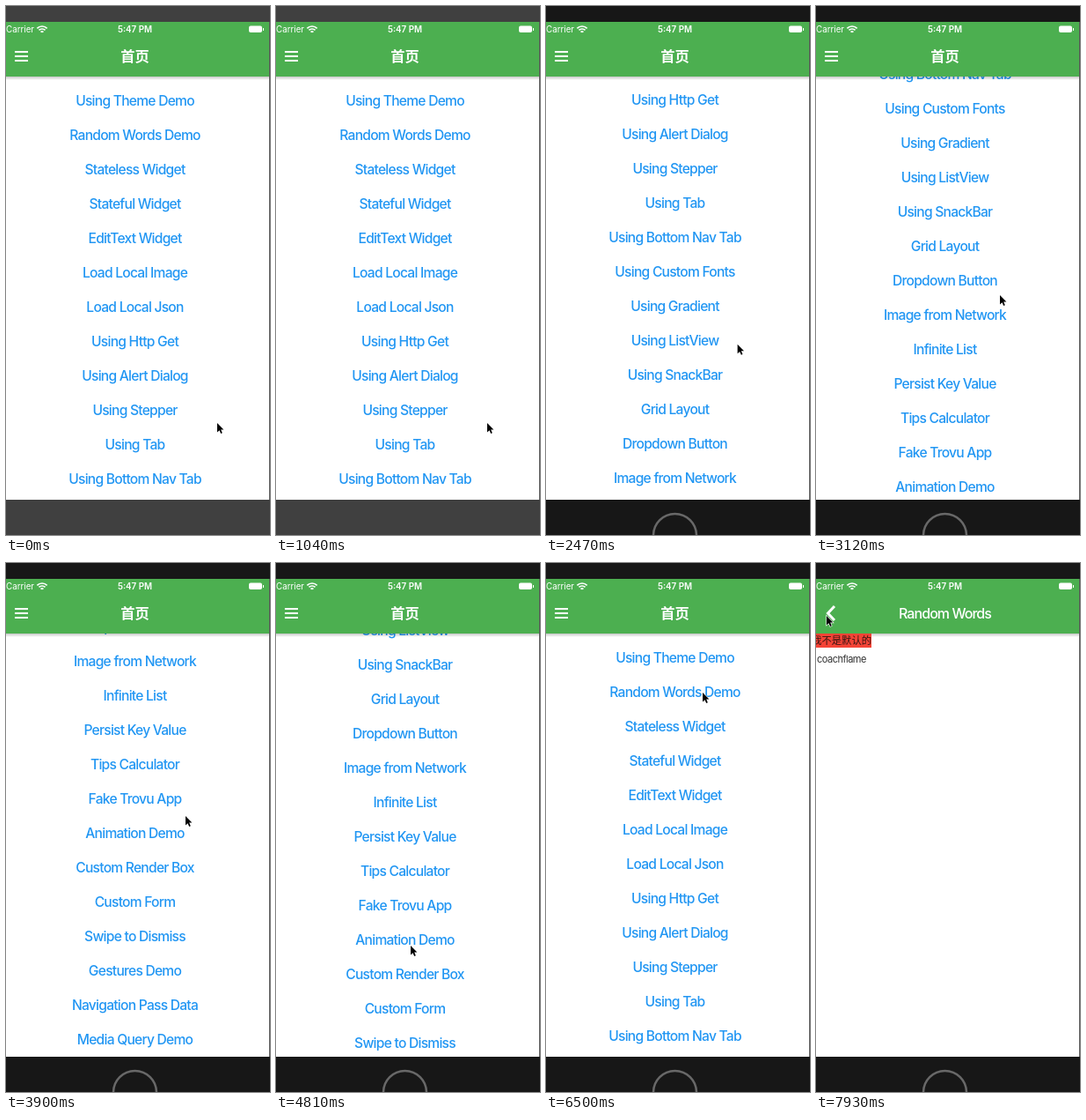
An HTML page with a canvas that plays this animation: 300 by 600 pixels, repeating every 8 s.

```html
<!DOCTYPE html>
<html lang="zh">
<meta charset="utf-8">
<style>
html, body { margin: 0; width: 100%; height: 100%; overflow: hidden; background: #171717 }
canvas { display: block }
</style>
<canvas id="stage" width="300" height="600"></canvas>
<script>
const ctx = document.getElementById('stage').getContext('2d');
const LOOP = 8000, STEP = 130, ROW = 39, MID = 146.5;
const GREEN = '#4caf50', BLUE = '#2196f3';
const FONT = 'Inter, "Noto Sans CJK SC", "Noto Sans CJK", sans-serif';
const ARROW = new Path2D('M0 0V10.5L2.5 8.3 4.2 12 5.8 11.3 4.2 7.6H7.4Z');
const labels = ['Using Theme Demo', 'Random Words Demo', 'Stateless Widget', 'Stateful Widget',
  'EditText Widget', 'Load Local Image', 'Load Local Json', 'Using Http Get', 'Using Alert Dialog',
  'Using Stepper', 'Using Tab', 'Using Bottom Nav Tab', 'Using Custom Fonts', 'Using Gradient',
  'Using ListView', 'Using SnackBar', 'Grid Layout', 'Dropdown Button', 'Image from Network',
  'Infinite List', 'Persist Key Value', 'Tips Calculator', 'Fake Trovu App', 'Animation Demo',
  'Custom Render Box', 'Custom Form', 'Swipe to Dismiss', 'Gestures Demo', 'Navigation Pass Data',
  'Media Query Demo'];

// Each gesture eases from the previous pose to this one
const start = { end: 0, scroll: 0, x: 240, y: 473 };
const gestures = [
  { begin: 1300, end: 1690, scroll: 30, x: 229, y: 457 },
  { begin: 1690, end: 3120, scroll: 459, x: 209, y: 328 },
  { begin: 3120, end: 3770, scroll: 698, x: 204, y: 287 },
  { begin: 4300, end: 4810, scroll: 577, x: 153, y: 434 },
  { begin: 4810, end: 5460, scroll: -8, x: 163, y: 245 },
  { begin: 5460, end: 5900, scroll: 0, x: 178, y: 147 },
  { begin: 7280, end: 7540, scroll: 0, x: 12, y: 60 },
];

const progress = (t, from, to) => Math.min(1, Math.max(0, (t - from) / (to - from)));
const smooth = u => u * u * (3 - 2 * u);

function poseAt(t) {
  const pose = { ...start };
  for (const g of gestures) {
    const u = smooth(progress(t, g.begin, g.end));
    for (const key of ['scroll', 'x', 'y']) pose[key] += (g[key] - pose[key]) * u;
  }
  return pose;
}

function rect(x, y, w, h, color) {
  ctx.fillStyle = color;
  ctx.fillRect(x, y, w, h);
}

function text(str, x, y, size, color, { weight = 400, spacing = 0, align = 'center' } = {}) {
  ctx.font = `${weight} ${size}px ${FONT}`;
  ctx.letterSpacing = spacing + 'px';
  ctx.textAlign = align;
  ctx.fillStyle = color;
  ctx.fillText(str, x, y);
}

function stroke(path, width, color = '#fff') {
  ctx.lineWidth = width;
  ctx.strokeStyle = color;
  ctx.stroke(new Path2D(path));
}

function arc(x, y, r, from, to, width, color) {
  ctx.beginPath();
  ctx.arc(x, y, r, from * Math.PI, to * Math.PI);
  ctx.lineWidth = width;
  ctx.strokeStyle = color;
  ctx.stroke();
}

function header() {
  const shade = ctx.createLinearGradient(0, 80, 0, 84);
  shade.addColorStop(0, 'rgba(0,0,0,.22)');
  shade.addColorStop(1, 'rgba(0,0,0,0)');
  rect(0, 80, 300, 4, shade);
  rect(0, 18, 300, 62, GREEN);
}

function homePage(scroll) {
  rect(0, 18, 300, 542, '#fff');
  labels.forEach((label, i) => {
    const y = 112.7 + i * ROW - scroll;
    text(label, MID, y, 15.6, BLUE, { weight: 500, spacing: -.75 });
  });
  header();
  stroke('M10 52H25M10 57H25M10 62H25', 1.8);
  text('首页', MID, 63, 16.25, '#fff', { weight: 700 });
}

function wordsPage() {
  rect(0, 18, 300, 542, '#fff');
  header();
  rect(0, 80, 63, 16, '#f44336');
  text('我不是默认的', 63, 92, 11.3, '#3a1512', { align: 'right' });
  text('coachflame', 1, 113, 11, '#333', { spacing: -.5, align: 'left' });
  stroke('M21 49L13.5 57 21 65', 3);
  text('Random Words', MID, 63, 16, '#fff', { weight: 500, spacing: -.95 });
}

function statusBar() {
  text('Carrier', 0, 30, 9.8, '#fff', { align: 'left' });
  text('5:47 PM', MID, 30, 9.8, '#fff', { weight: 600 });
  for (const r of [2, 5, 8]) arc(41, 31, r, -.75, -.25, 1.7, '#fff');
  ctx.fillStyle = '#fff';
  ctx.beginPath();
  ctx.roundRect(276, 22.5, 15, 7.5, 2);
  ctx.fill();
  rect(292, 25, 1, 3, '#fff');
}

function shifted(dx, dy, paint) {
  ctx.save();
  ctx.translate(dx, dy);
  paint();
  ctx.restore();
}

function cursor() {
  ctx.lineWidth = 1.2;
  ctx.strokeStyle = '#fff';
  ctx.stroke(ARROW);
  ctx.fillStyle = '#000';
  ctx.fill(ARROW);
}

function draw(t) {
  const { scroll, x, y } = poseAt(t);
  const focused = t >= 1300;
  rect(0, 0, 300, 600, focused ? '#171717' : '#404040');
  if (focused) arc(146.5, 600.5, 24.5, 0, 2, 2.5, '#686868');
  ctx.save();
  ctx.beginPath();
  ctx.rect(0, 18, 300, 542);
  ctx.clip();
  const slide = 1 - (1 - progress(t, 6600, 7000)) ** 3;
  shifted(-100 * slide, 0, () => homePage(scroll));
  if (slide > 0) shifted(300 * (1 - slide), 0, wordsPage);
  statusBar();
  rect(299, 18, 1, 542, '#555');
  ctx.restore();
  shifted(x, y, cursor);
}

function frame() {
  const t = performance.now() % LOOP;
  draw(Math.floor(t / STEP) * STEP);
  requestAnimationFrame(frame);
}
frame();
</script>
</html>
```
